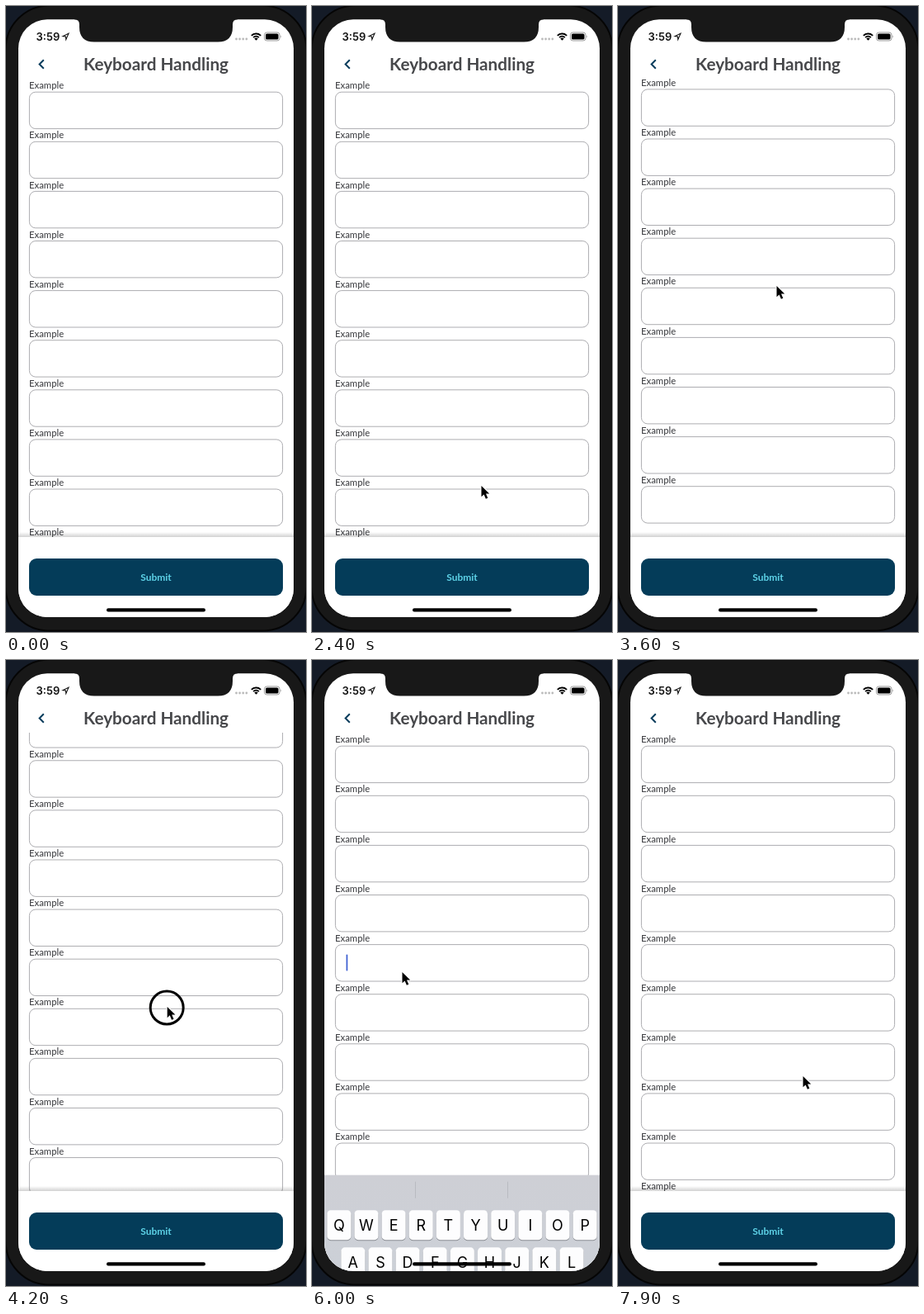
Write an HTML page with a canvas that moves like this. It is 364x758 px and loops after 8000 ms.

```html
<!DOCTYPE html>
<html lang="en">
<head>
<meta charset="utf-8">
<title>Keyboard Handling</title>
<style>
html, body { margin: 0; width: 100%; height: 100%; overflow: hidden; background: #141b27; }
canvas { display: block; }
</style>
</head>
<body>
<canvas id="stage" width="364" height="758"></canvas>
<script>
const ctx = document.getElementById('stage').getContext('2d');
const LOOP = 8000, STEP = 100;
const ROWS = 12, PITCH = 60.1, END = 183.6;
const SCREEN = [15, 16.3, 334, 723.7, 35];
const UI = 'Inter, "Liberation Sans", sans-serif';
const BODY = 'Lato, "Open Sans", sans-serif';

// Each key is [time, ...values]; values ease between neighbours.
const pointer = [
  [100, 300, 620], [800, 232, 570], [900, 232, 570], [1300, 226, 373],
  [1700, 226, 373], [2200, 205, 580], [2500, 205, 580], [3000, 197.5, 539],
  [3150, 197.5, 539], [3500, 192, 338], [3900, 192, 338], [4650, 201, 568],
  [4850, 160, 575], [5400, 109, 377], [6500, 109, 377], [6900, 354.5, 678],
  [7050, 372, 700], [7400, 360, 690], [7900, 224, 503]
];
const scroll = [
  [900, 0], [1300, END + 14], [1450, END], [1700, END], [2200, -24], [2350, 0],
  [3150, 0], [3500, END + 18], [3600, END], [3900, END], [4650, END - 230], [4800, 0]
];
const keyboard = [[5800, 0], [6250, 1], [7200, 1], [7600, 0]];
const presses = [[800, 1300], [1500, 2200], [3000, 3500], [3700, 4700], [5700, 5900]];

const smooth = u => u * u * (3 - 2 * u);

function sample(keys, t) {
  const i = keys.findIndex(k => k[0] > t);
  if (i === 0) return keys[0].slice(1);
  if (i < 0) return keys[keys.length - 1].slice(1);
  const a = keys[i - 1], b = keys[i];
  const u = smooth((t - a[0]) / (b[0] - a[0]));
  return a.slice(1).map((v, n) => v + (b[n + 1] - v) * u);
}

// Halve the travel beyond either end of the list.
function rubber(s) {
  const inside = Math.max(0, Math.min(END, s));
  return inside + (s - inside) / 2;
}

function box(x, y, w, h, r, fill, stroke, line = 1) {
  ctx.beginPath();
  ctx.roundRect(x, y, w, h, r);
  if (fill) { ctx.fillStyle = fill; ctx.fill(); }
  if (stroke) { ctx.strokeStyle = stroke; ctx.lineWidth = line; ctx.stroke(); }
}

function text(s, x, y, font, color, align = 'center') {
  ctx.font = font;
  ctx.fillStyle = color;
  ctx.textAlign = align;
  ctx.fillText(s, x, y);
}

function path(d, fill, stroke, line = 1) {
  const p = new Path2D(d);
  if (fill) { ctx.fillStyle = fill; ctx.fill(p); }
  if (stroke) { ctx.strokeStyle = stroke; ctx.lineWidth = line; ctx.stroke(p); }
}

function at(x, y, draw) {
  ctx.save();
  ctx.translate(x, y);
  draw();
  ctx.restore();
}

function onScreen(draw) {
  ctx.save();
  ctx.beginPath();
  ctx.roundRect(...SCREEN);
  ctx.clip();
  draw();
  ctx.restore();
}

function drawBody() {
  ctx.fillStyle = '#141b27';
  ctx.fillRect(0, 0, 364, 758);
  box(-0.5, -0.5, 365, 757, 53, '#181818', '#050505', 2);
  box(...SCREEN, '#fff');
}

function drawNotch() {
  path('M83 15V16.3Q89 16.3 89 22.3V25.5Q89 43.5 107 43.5H257Q275 43.5 275 25.5V22.3Q275 16.3 281 16.3V15Z', '#181818');
}

function drawStatus() {
  text('3:59', 36.5, 41.5, '600 13px ' + UI, '#111', 'left');
  path('M76 33.2L69 36.6L72.4 37L72.8 40.6Z', null, '#111', 1.1);
  ctx.fillStyle = '#bbb';
  for (let i = 0; i < 4; i++) {
    ctx.beginPath();
    ctx.arc(279.5 + i * 4.1, 40, 1.4, 0, 7);
    ctx.fill();
  }
  ctx.strokeStyle = '#000';
  ctx.lineWidth = 1.9;
  for (const r of [4.6, 7.8]) {
    ctx.beginPath();
    ctx.arc(303.5, 41.3, r, -Math.PI * 0.76, -Math.PI * 0.24);
    ctx.stroke();
  }
  path('M303.5 41.8L301.3 39.4Q303.5 37.6 305.7 39.4Z', '#000');
  box(313.5, 32, 18.5, 10, 3, null, '#999');
  box(315, 33.5, 15.5, 7, 1.6, '#000');
  path('M333.3 35.2Q335 37 333.3 38.8Z', '#999');
}

function drawHeader() {
  path('M45.8 65.3L40.6 70.5L45.8 75.7', null, '#083c5c', 2);
  text('Keyboard Handling', 182, 78, '700 20.7px ' + BODY, '#47484b');
}

function drawList(offset, caret) {
  ctx.save();
  ctx.beginPath();
  ctx.rect(15, 88, 334, 555);
  ctx.clip();
  for (let i = 0; i < ROWS; i++) {
    const y = i * PITCH - offset;
    text('Example', 28, y + 100.3, '500 11.3px ' + BODY, '#45464a', 'left');
    box(28.4, y + 104.2, 307.2, 44.4, 7.5, '#fff', '#adadb1');
  }
  if (caret) box(41.5, 356.5, 1.8, 20, 0.9, '#4163d3');
  ctx.restore();
}

function drawFooter() {
  const shade = ctx.createLinearGradient(0, 637, 0, 643);
  shade.addColorStop(0, 'rgba(0,0,0,0)');
  shade.addColorStop(1, 'rgba(0,0,0,.18)');
  ctx.fillStyle = shade;
  ctx.fillRect(15, 637, 334, 6);
  ctx.fillStyle = '#fff';
  ctx.fillRect(15, 643, 334, 97);
  box(28, 669, 308, 45, 9, '#043c59');
  text('Submit', 182, 695.8, '700 12px ' + BODY, '#5ed3e8');
}

function key(x, y, w, label, size, fill = '#fdfdfe', color = '#000') {
  box(x, y + 1, w, 36, 4.5, '#898c92');
  box(x, y, w, 36, 4.5, fill);
  if (label) text(label, x + w / 2, y + 18 + size * 0.36, '400 ' + size + 'px ' + UI, color);
}

function drawGlobe() {
  path('M-10 0A10 10 0 1 0 10 0A10 10 0 1 0 -10 0ZM-4.6 0A4.6 10 0 1 0 4.6 0A4.6 10 0 1 0 -4.6 0Z' +
    'M-10 0H10M0 -10V10M-8 -5.5Q0 -2.5 8 -5.5M-8 5.5Q0 2.5 8 5.5', null, '#55595f', 1.2);
}

function drawMic() {
  box(-3.5, -12, 7, 15, 3.5, null, '#62666c', 1.4);
  path('M-6.7 -2V0.5Q-6.7 6.3 0 6.3T6.7 0.5V-2M0 6.3V10.5M-4 10.5H4', null, '#62666c', 1.4);
}

function drawFace() {
  ctx.lineWidth = 1.3;
  ctx.strokeStyle = ctx.fillStyle = '#22252a';
  ctx.beginPath();
  ctx.arc(0, 0, 7.6, 0, 7);
  ctx.stroke();
  for (const x of [-2.7, 2.7]) {
    ctx.beginPath();
    ctx.arc(x, -2.3, 1.3, 0, 7);
    ctx.fill();
  }
  path('M-5 1H5Q4.2 5.6 0 5.6T-5 1Z', '#22252a');
}

function drawKeyboard(shown) {
  ctx.translate(0, (1 - shown) * 279);
  const gray = '#abb2be';
  const back = ctx.createLinearGradient(0, 461, 0, 740);
  back.addColorStop(0, '#cecfd5');
  back.addColorStop(1, '#c8d1da');
  ctx.fillStyle = back;
  ctx.fillRect(15, 461, 334, 279);
  ctx.fillStyle = '#b9bbc1';
  for (const x of [125, 237]) ctx.fillRect(x, 469, 1, 20);

  [['QWERTYUIOP', 18.3, 503.5], ['ASDFGHJKL', 35.3, 548.7], ['ZXCVBNM', 68.5, 594]]
    .forEach(([letters, x, y]) =>
      [...letters].forEach((c, i) => key(x + i * 33.15, y, 29, c, 18)));

  key(18.3, 594, 36, '', 0);
  path('M36.5 604.5L44.5 612.5H40.2V619H32.8V612.5H28.5Z', '#000');
  key(310, 594, 36, '', 0, gray);
  path('M318.5 612L324 606.3H336.5V617.7H324ZM326.8 609L332.5 615M332.5 609L326.8 615', null, '#22252a', 1.4);
  key(18.3, 639.3, 36.5, '123', 13, gray);
  key(60.5, 639.3, 36.5, '', 0, gray);
  at(79, 657, drawFace);
  key(102, 639.3, 160.5, 'space', 13);
  key(267.5, 639.3, 78.5, 'done', 13, '#0a78fb', '#e9f3ff');
  at(48, 707.5, drawGlobe);
  at(316, 707.5, drawMic);
}

function drawPointer(x, y, pressed) {
  at(x, y, () => {
    if (pressed) {
      ctx.beginPath();
      ctx.arc(0, 2, 20, 0, 7);
      ctx.strokeStyle = '#000';
      ctx.lineWidth = 3;
      ctx.stroke();
    }
    const arrow = 'M0.5 1V14.3L3.6 11.4L5.9 16.8L8.3 15.8L6 10.5H10.2Z';
    ctx.lineJoin = 'round';
    path(arrow, null, '#fff', 2.2);
    path(arrow, '#000');
  });
}

function draw(t) {
  ctx.lineJoin = 'miter';
  const caret = t >= 5900 && t < 7250 && (t - 5900) % 1000 < 600;
  const shown = sample(keyboard, t)[0];
  drawBody();
  drawList(rubber(sample(scroll, t)[0]), caret);
  drawStatus();
  drawHeader();
  onScreen(drawFooter);
  if (shown > 0) onScreen(() => drawKeyboard(shown));
  box(122, 729.3, 120, 4.2, 2.1, '#000');
  drawNotch();
  if (t >= 100) {
    const [x, y] = sample(pointer, t);
    drawPointer(x, y, presses.some(([a, b]) => t >= a && t < b));
  }
}

const start = performance.now();
function tick() {
  const t = (performance.now() - start) % LOOP;
  draw(Math.floor(t / STEP) * STEP);
  requestAnimationFrame(tick);
}
tick();
</script>
</body>
</html>
```
